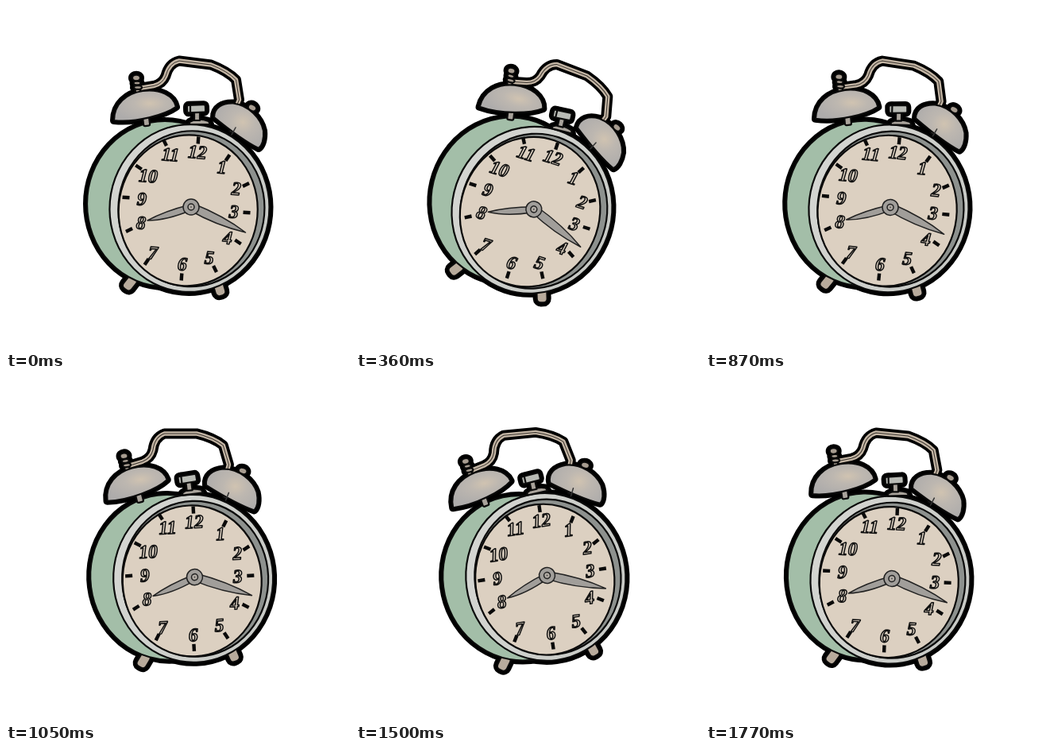
Animation of 433x433 px, one loop 1.8 s. Source, as an HTML page:

```html
<!DOCTYPE html>
<html lang="en">
<head>
<meta charset="utf-8">
<title>Alarm clock</title>
<style>
html, body { margin: 0; width: 100%; height: 100%; overflow: hidden; background: #fff; }
svg { display: block; width: 100vw; height: 100vh; }
text { font: italic bold 23.5px "Liberation Serif", "Noto Serif", serif; text-anchor: middle; }
</style>
</head>
<body>
<svg viewBox="0 0 433 433" stroke-linejoin="round" stroke-linecap="round">
  <defs>
    <radialGradient id="metal" cx=".58" cy=".42" r=".62">
      <stop offset="0" stop-color="#d0c3b1"/>
      <stop offset=".4" stop-color="#bdb7b0"/>
      <stop offset="1" stop-color="#aeacab"/>
    </radialGradient>
    <linearGradient id="rim" x2="1" y2=".4">
      <stop offset="0" stop-color="#d6d7d3"/>
      <stop offset="1" stop-color="#c8cac6"/>
    </linearGradient>
    <g id="parts">
      <g fill="#b8ab9c">
        <rect x="-6.500" y="-9.500" width="13" height="19" rx="5" transform="translate(156 349) rotate(38)"/>
        <rect x="-6.500" y="-10" width="13" height="20" rx="5" transform="translate(268.500 355) rotate(-16)"/>
      </g>
      <ellipse cx="200" cy="249" rx="98" ry="104" fill="#a3bea8"/>
      <ellipse cx="231" cy="254.500" rx="100.500" ry="105.500" fill="url(#rim)" transform="rotate(5 231 254)"/>
      <g fill="#a9a39b">
        <path d="M231 146Q241 140 255 145L257 149 231 149Z"/>
        <rect x="237" y="133" width="7" height="11"/>
        <rect x="228" y="124.500" width="23" height="9.500" rx="2" fill="#b9bbb5" transform="rotate(-2 240 129)"/>
        <path d="M232 125V134" fill="none"/>
        <rect x="172.500" y="136" width="8" height="15" rx="2" transform="rotate(-7 176 144)"/>
        <rect x="283" y="148" width="7" height="12" rx="2" transform="rotate(28 286 154)"/>
      </g>
      <g fill="#a79c90">
        <path d="M162 96L168 96 169 109 163 109Z"/>
        <ellipse cx="164" cy="90.500" rx="5" ry="3.800"/>
        <ellipse cx="165" cy="97" rx="4.500" ry="2.400"/>
        <ellipse cx="166" cy="102.500" rx="5" ry="2.400"/>
        <ellipse cx="310" cy="128" rx="5.500" ry="4" transform="rotate(28 310 128)"/>
      </g>
      <g fill="url(#metal)">
        <path d="M136 144C136 123 152 110 172 107C194 104 211 113 214 127C200 137 164 147 136 144Z"/>
        <path d="M262 140C262 128 272 122 286 122.500C306 125 321 142 324 157C325 168 322 176 318 179C304 172 284 158 262 140Z"/>
      </g>
    </g>
    <path id="handle" d="M171 103L186 100.500Q197 98 201 88Q205 72 218 69L258 74Q279 82 289.500 93L293.500 118 291 124" fill="none"/>
  </defs>
  <g id="clock">
    <use href="#parts" stroke="#000" stroke-width="10"/>
    <use href="#handle" stroke="#000" stroke-width="13"/>
    <use href="#handle" stroke="#c4b6a5" stroke-width="5.500"/>
    <use href="#handle" stroke="#3a342e" stroke-width="1"/>
    <use href="#parts" stroke="#0a0a0a" stroke-width="2.200"/>
    <path d="M289 153L284 162" stroke="#333" stroke-width="1.500"/>
    <g stroke="#0a0a0a" stroke-width="2.200" transform="rotate(5 231 254)">
      <ellipse cx="233.500" cy="255" rx="92" ry="98" fill="#8d918e"/>
      <ellipse cx="229.500" cy="257.500" rx="87.500" ry="95" fill="#dcd0c1"/>
    </g>
    <g id="dial"></g>
    <g fill="#a19e9a" stroke="#222" stroke-width="1.500">
      <path d="M232 250Q200 258 178 270Q202 270 233 257Z"/>
      <path d="M235 248.500Q274 264 301.500 285Q264 276 231 257Z"/>
      <circle cx="233" cy="253" r="10"/>
      <circle cx="233" cy="253" r="4" fill="#b0aaa3"/>
      <circle cx="233" cy="253" r=".8" fill="#333" stroke="none"/>
    </g>
  </g>
</svg>
<script>
const PERIOD = 1800, STEP = 30, SWING = 14.5;
const clock = document.getElementById('clock');

// numeral x, y, then tick x, y, from 1 to 12
const hours = [
  [272, 203, 279, 191], [290, 230, 302, 225], [287, 259, 303, 260],
  [279, 292, 292, 297], [256, 317, 263, 331], [222, 325, 221, 341],
  [185, 311, 177, 322], [170, 273, 155, 282], [171, 243, 151, 241],
  [179, 214, 167, 203], [207, 187, 200, 172], [241, 184, 242, 169]
];
document.getElementById('dial').innerHTML = hours.map(([x, y, tx, ty], i) => {
  const turn = (i + 1) * 30 + 4;
  return `<rect x="-2.200" y="-4.500" width="4.400" height="9" fill="#0a0a0a" transform="translate(${tx} ${ty}) rotate(${turn})"/>
    <text y="7.700" fill="#dcd0c1" stroke="#111" stroke-width="1.500" transform="translate(${x} ${y}) rotate(4)">${i + 1}</text>`;
}).join('');

function draw() {
  const t = Math.floor(performance.now() % PERIOD / STEP) * STEP;
  const angle = SWING * Math.sin(2 * Math.PI * t / PERIOD);
  clock.setAttribute('transform', `rotate(${angle} 216.500 216.500)`);
  requestAnimationFrame(draw);
}
draw();
</script>
</body>
</html>
```
